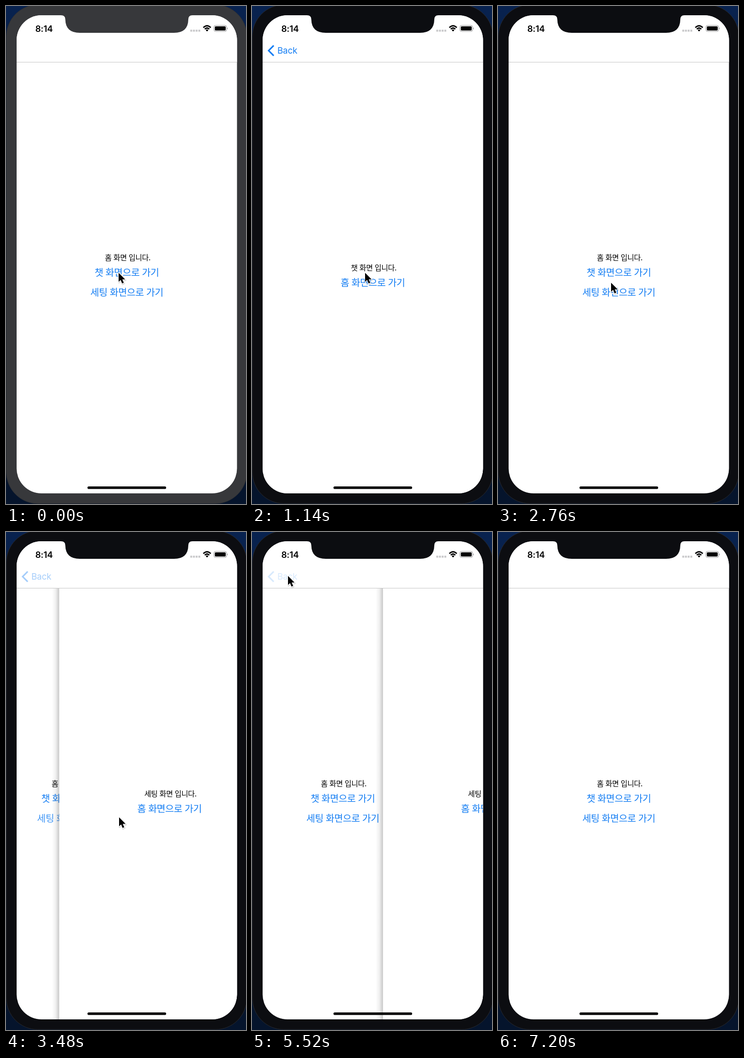
Write an HTML page that moves like this. It is 520x1077 px and loops after 7.26 s.

```html
<!DOCTYPE html>
<html lang="ko">
<head>
<meta charset="utf-8">
<title>Stack navigation</title>
<style>
html, body { margin: 0; width: 100%; height: 100%; overflow: hidden; background: #07193a; }
svg { display: block; width: 520px; height: 1077px; }
text { font-family: 'Noto Sans CJK KR', 'Noto Sans CJK', 'Noto Sans CJK JP', sans-serif; letter-spacing: -.025em; text-anchor: middle; }
.label { font-size: 16.1px; fill: #000; }
.link { font-size: 20.6px; fill: #157ef3; }
.latin { font-family: Inter, sans-serif; text-anchor: start; letter-spacing: -.01em; }
</style>
</head>
<body>
<svg viewBox="0 0 520 1077">
  <defs>
    <linearGradient id="sky" x1="0" y1="0" x2="0" y2="1">
      <stop offset="0" stop-color="#08224f"/>
      <stop offset=".5" stop-color="#061633"/>
      <stop offset="1" stop-color="#05142c"/>
    </linearGradient>
    <linearGradient id="shade">
      <stop offset="0" stop-color="#000" stop-opacity="0"/>
      <stop offset=".5" stop-color="#000" stop-opacity=".06"/>
      <stop offset="1" stop-color="#000" stop-opacity=".22"/>
    </linearGradient>
    <clipPath id="screen"><rect x="23" y="20" width="477.5" height="1034" rx="54"/></clipPath>
  </defs>

  <rect width="520" height="1077" fill="url(#sky)"/>
  <rect id="body" x=".8" y="-2.5" width="521" height="1078.5" rx="68"/>

  <g clip-path="url(#screen)">
    <rect x="23" y="20" width="478" height="1034" fill="#fff"/>
    <g id="home">
      <text class="label" x="263.7" y="550">홈 화면 입니다.</text>
      <text class="link" id="toChat" x="261.7" y="583.5">챗 화면으로 가기</text>
      <text class="link" id="toSet" x="261.7" y="627">세팅 화면으로 가기</text>
    </g>
    <g id="card">
      <rect x="7" y="122" width="16" height="932" fill="url(#shade)"/>
      <rect x="23" y="122" width="478" height="932" fill="#fff"/>
      <text class="label" id="title" x="263.7" y="571.7"></text>
      <text class="link" id="toHome" x="261.7" y="605.5">홈 화면으로 가기</text>
    </g>
    <rect x="23" y="20" width="478" height="101" fill="#fff"/>
    <rect x="23" y="121" width="478" height="1" fill="#c3c3c3"/>
    <g id="back">
      <path d="M47 85.5 36 96.5 47 107.5" fill="none" stroke="#157ef3" stroke-width="3.2"/>
      <text class="latin" x="55" y="103.3" font-size="18.8" fill="#157ef3">Back</text>
    </g>
    <path id="notch" d="M119 19V20Q128.500 20 128.500 29Q129 58 160 58H364Q394.500 58 395 29Q395 20 404 20V19Z"/>
    <rect x="176.500" y="1039" width="170.500" height="5.600" rx="2.800"/>
  </g>

  <text class="latin" x="63.500" y="55.500" font-size="18.800" font-weight="600">8:14</text>
  <path d="M399.300 53.300H421" stroke="#c9c9cb" stroke-width="4.200" stroke-dasharray="4.200 1.600"/>
  <g fill="none" stroke="#000" stroke-width="2.900">
    <path d="M427.600 46.800Q435.600 38.800 443.600 46.800"/>
    <path d="M430.700 50Q435.600 45.200 440.500 50"/>
    <path d="M435.600 55.200 432.700 52.100Q435.600 49.600 438.500 52.100Z" fill="#000" stroke="none"/>
  </g>
  <rect x="450.500" y="42" width="27.500" height="13" rx="3.800" fill="none" stroke="#8c8c8e"/>
  <rect x="452.500" y="44" width="23.500" height="9" rx="2"/>
  <path d="M479.300 46.500Q481.800 48.500 479.300 50.700Z" fill="#8c8c8e"/>

  <g id="cursor">
    <path d="M0 0V19.500L4.400 15.400 7.600 23 11.200 21.400 8 14.200H14.200Z" transform="translate(.8 1.800)"
      fill="#000" stroke="#000" stroke-width="3.500" stroke-linejoin="round" opacity=".13"/>
    <path d="M0 0V19.500L4.400 15.400 7.600 23 11.200 21.400 8 14.200H14.200Z"
      stroke="#fff" stroke-width="2.400" stroke-linejoin="round" paint-order="stroke"/>
  </g>
</svg>
<script>
const LOOP = 7260, STEP = 60, SLIDE = 500, WIDTH = 477.5;
const el = id => document.getElementById(id);
const clamp = v => Math.min(1, Math.max(0, v));
const smooth = u => u < .5 ? 2 * u * u : 1 - 2 * (1 - u) * (1 - u);

// [press, release] of each tap
const taps = { chat: [420, 506], home: [2020, 2109], settings: [3230, 3331], back: [5340, 5435] };

// time, x, y of the pointer tip
const path = [
  [0, 244, 577], [60, 245, 577], [1440, 245, 577], [1800, 245, 591],
  [2640, 245, 591], [3060, 245, 617], [3960, 245, 617],
  [4440, 98, 253], [4920, 78, 95], [5940, 78, 95], [6360, 100, -40]
];

// header opacity against slide position
const fade = [[0, 0], [.454, .23], [.656, .28], [.807, .38], [.925, .78], [1, 1]];

function track(points, t) {
  const i = points.findIndex(p => p[0] > t);
  if (i < 0) return points[points.length - 1].slice(1);
  const a = points[i - 1], b = points[i], u = (t - a[0]) / (b[0] - a[0]);
  return a.slice(1).map((v, k) => v + (b[k + 1] - v) * u);
}

// cubic-bezier(.2833, .99, .31833, .99)
function ease(x) {
  if (x <= 0 || x >= 1) return clamp(x);
  const at = (s, a, b) => 3 * (1 - s) * (1 - s) * s * a + 3 * (1 - s) * s * s * b + s * s * s;
  let lo = 0, hi = 1;
  for (let i = 0; i < 24; i++) {
    const mid = (lo + hi) / 2;
    if (at(mid, .2833, .31833) < x) lo = mid; else hi = mid;
  }
  return at(lo, .99, .99);
}

function touch(t, [press, release], min = .2) {
  const down = s => 1 - (1 - min) * smooth(clamp((s - press) / 150));
  if (t < release) return down(t);
  const held = down(release);
  return held + (1 - held) * smooth(clamp((t - release) / 250));
}

const slide = (t, tap) => ease((t - tap[1]) / SLIDE);
const shift = (node, x, y = 0) => node.setAttribute('transform', `translate(${x} ${y})`);
const alpha = (node, v) => node.setAttribute('opacity', v);

function draw(t) {
  const first = t < 2760;
  const pos = first
    ? slide(t, taps.chat) - slide(t, taps.home)
    : slide(t, taps.settings) - slide(t, taps.back);

  const shell = t < 420 ? '#37383b' : '#0c0d11';
  el('body').setAttribute('fill', shell);
  el('body').setAttribute('stroke', t < 420 ? '#2e2f32' : '#292a2e');
  el('notch').setAttribute('fill', shell);

  shift(el('home'), -.3 * WIDTH * pos);
  shift(el('card'), WIDTH * (1 - pos));
  el('card').style.display = pos > 0 ? '' : 'none';
  el('title').textContent = first ? '챗 화면 입니다.' : '세팅 화면 입니다.';

  alpha(el('toChat'), touch(t, taps.chat));
  alpha(el('toSet'), touch(t, taps.settings));
  alpha(el('toHome'), touch(t, taps.home));
  alpha(el('back'), track(fade, pos)[0] * touch(t, taps.back, .5));
  shift(el('cursor'), ...track(path, t));
}

function tick() {
  const t = performance.now() % LOOP;
  draw(Math.floor(t / STEP) * STEP);
  requestAnimationFrame(tick);
}
tick();
</script>
</body>
</html>
```
